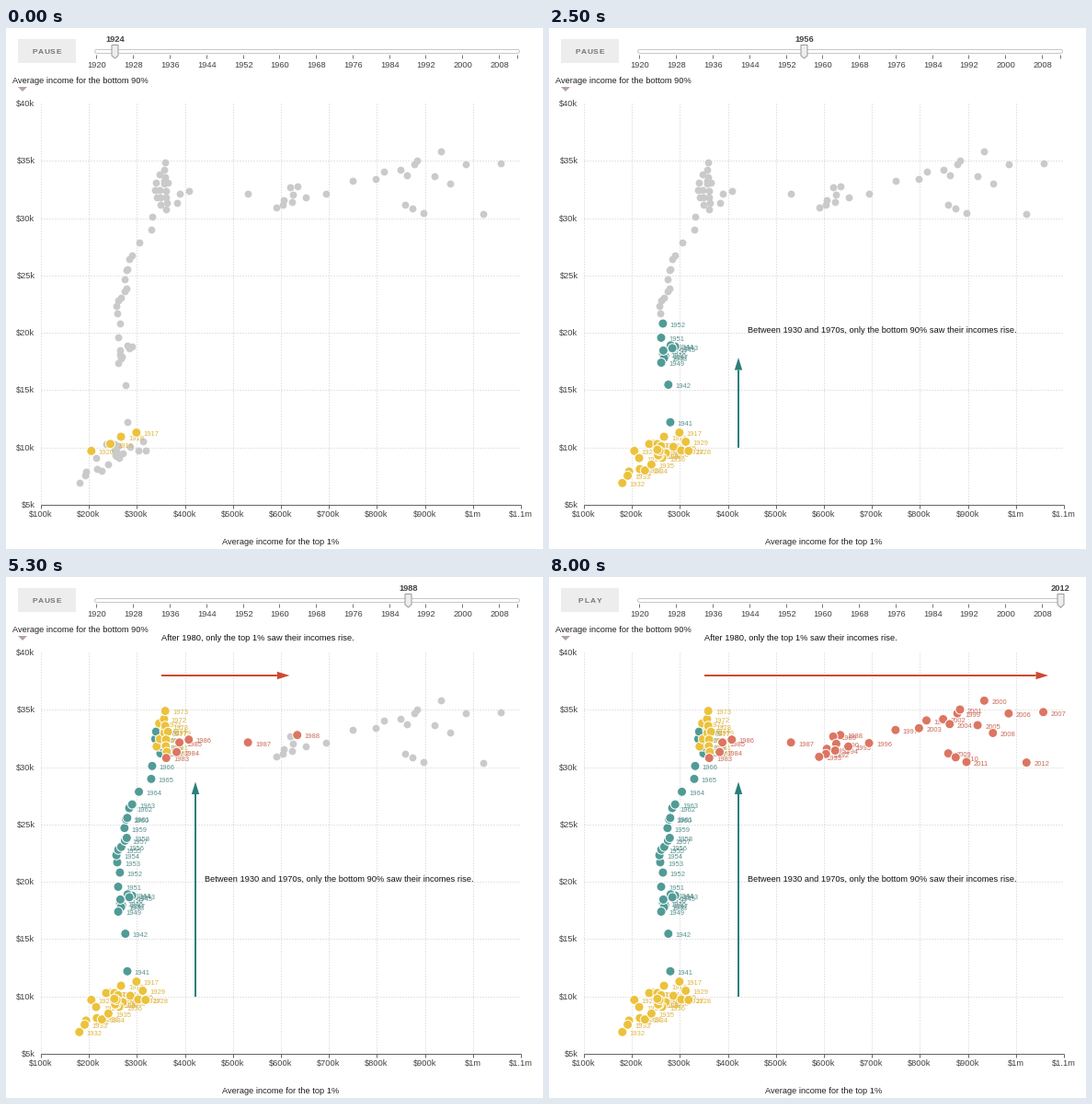
A matplotlib script for the animation above (8050 ms loop, 584 px wide and 566 px high).

```python
import math

import matplotlib.pyplot as plt
import numpy as np
from matplotlib.animation import FuncAnimation
from matplotlib.colors import to_rgba
from matplotlib.patches import FancyBboxPatch, Polygon, Rectangle

W, H, DPI = 584, 566, 128
PX = 72 / DPI                      # one pixel in points
INTERVAL, FRAMES = 50, 161
HOLD = 1.4                         # drawn pictures last 70 ms on a 50 ms clock
STEP = 4.5                         # pictures per four-year step
FADE = 4.2 / STEP

FIRST, LAST, START = 1917, 2012, 1924
PERIOD_ENDS = [1941, 1971, 1983]
FILLS = ["#ecc23c", "#519b96", "#dc7562"]
INKS = ["#dfb545", "#5a9390", "#cb6a5a"]

# Turning points: year, top 1% and bottom 90% income in $1000
TURNS = np.array([
    (1917, 299, 11.3), (1920, 205, 9.7), (1921, 194, 7.9), (1923, 236, 10.3),
    (1928, 318, 9.7), (1929, 312, 10.5), (1932, 180, 6.9), (1936, 263, 9.1),
    (1940, 253, 9.8), (1941, 280, 12.2), (1943, 290, 18.8), (1949, 261, 17.4),
    (1953, 259, 21.7), (1963, 290, 26.75), (1967, 349, 31.2), (1970, 340, 33.1),
    (1973, 359, 34.9), (1975, 341, 31.8), (1978, 359, 33.6), (1983, 361, 30.8),
    (1986, 408, 32.4), (1988, 634, 32.8), (1993, 590, 30.9), (1996, 694, 32.1),
    (2000, 934, 35.8), (2003, 798, 33.4), (2007, 1057, 34.8), (2009, 859, 31.2),
    (2011, 897, 30.45), (2012, 1022, 30.4)])


def income_x(top):
    return 38 + (top - 100) * 0.522


def income_y(bottom):
    return 82 + (40 - bottom) * 12.457


def year_x(year):
    return 98.5 + (year - 1920) * 4.972


def make_dots():
    """Follow the turning points, with a little scatter in between."""
    turn, top, bottom = TURNS.T
    scatter = np.random.default_rng(4).normal(0, 1, (2, len(years)))
    scatter *= ~np.isin(years, turn)
    return np.column_stack([income_x(np.interp(years, turn, top) + 5 * scatter[0]),
                            income_y(np.interp(years, turn, bottom) + 0.15 * scatter[1])])


years = np.arange(FIRST, LAST + 1)
dots = make_dots()
kinds = np.array([0, 1, 0, 2])[np.digitize(years, PERIOD_ENDS)]
fills = np.array([to_rgba(FILLS[k]) for k in kinds])
starts = np.ceil((years - START) / 4)

plt.rcParams["font.family"] = "Liberation Sans"
fig = plt.figure(figsize=(W / DPI, H / DPI), dpi=DPI, facecolor="white")
ax = fig.add_axes([0, 0, 1, 1])
ax.set_xlim(0, W)
ax.set_ylim(H, 0)
ax.axis("off")


def text(x, y, s, size=9.3, color="#222222", ha="left", **kw):
    return ax.text(x, y, s, fontsize=size * PX, color=color, ha=ha, va="baseline", **kw)


def rule(x0, y0, x1, y1, color="#666666", **kw):
    """One-pixel line through pixel centres."""
    ax.plot([x0 + 0.5, x1 + 0.5], [y0 + 0.5, y1 + 0.5], color=color, lw=PX,
            solid_capstyle="butt", snap=False, **kw)


def ease(t):
    t = min(max(t, 0), 1)
    return 4 * t ** 3 if t < 0.5 else 1 - 4 * (1 - t) ** 3


def money(k):
    return f"${k}k" if k < 1000 else f"${k / 1000:g}m"


def draw_axes():
    dotted = dict(color="#cccccc", dashes=(1, 2), dash_capstyle="butt", zorder=0)
    for k in range(5, 41, 5):
        y = round(income_y(k))
        text(31.5, y + 3.3, money(k), color="#444444", ha="right")
        if 5 < k < 40:
            rule(38, y, 560, y, **dotted)
    for k in range(100, 1101, 100):
        x = round(income_x(k))
        text(x, 531.3, money(k), color="#444444", ha="center")
        rule(x, 518, x, 522)
        if k < 1100:
            rule(x, 82, x, 518, **dotted)
    rule(38, 518, 560, 518)
    text(6.7, 60, "Average income for the bottom 90%")
    text(299, 561.2, "Average income for the top 1%", ha="center")
    ax.add_patch(Polygon([(13, 64), (23, 64), (18, 69)], fc="#b3a0a8", ec="none"))


def draw_slider():
    ax.add_patch(FancyBboxPatch((96.5, 23.5), 462, 4, fc="white", ec="#c8c8c8", lw=PX,
                                boxstyle="round,pad=0,rounding_size=2"))
    for year in [*range(1920, 2009, 8), LAST]:
        x = round(year_x(year))
        rule(x, 29, x, 33, "#777777")
        if year < LAST:
            text(x + 0.5, 43.3, str(year), color="#444444", ha="center")


def button_word(word):
    mid = (len(word) - 1) / 2
    return [text(44.5 + 6.5 * (i - mid), 28.2, c, 8.4, "#777777", "center", weight="bold")
            for i, c in enumerate(word)]


class Arrow:
    """Arrow with a caption; grows at an even speed from its tail."""

    def __init__(self, tail, way, reach, begin, steps, color, caption):
        self.tail, self.way = np.array(tail, float), np.array(way, float)
        self.side = self.way[::-1]
        self.reach, self.begin, self.steps = reach, begin, steps
        self.shaft, = ax.plot([], [], color=color, lw=2 * PX, snap=False,
                              solid_capstyle="butt", zorder=5)
        self.head = ax.add_patch(Polygon(np.zeros((3, 2)), fc=color, ec="none", zorder=5))
        self.caption = text(*caption, color="#111111", zorder=5)

    def update(self, step):
        t = step - self.begin
        for part in (self.shaft, self.head, self.caption):
            part.set_visible(t >= 0)
        if t < 0:
            return
        neck = self.tail + self.way * self.reach * min(t / self.steps, 1)
        self.shaft.set_data(*zip(self.tail, neck))
        self.head.set_xy([neck + 4.2 * self.side, neck + 13.5 * self.way,
                          neck - 4.2 * self.side])
        self.caption.set_alpha(ease(t / FADE))


draw_axes()
draw_slider()
ax.add_patch(Rectangle((13, 12), 63, 26, fc="#ededed", ec="none"))
words = {w: button_word(w) for w in ("PAUSE", "PLAY")}

knob_shape = np.array([(-3.5, 18.5), (3.5, 18.5), (3.5, 30), (0, 33), (-3.5, 30)])
knob = ax.add_patch(Polygon(knob_shape, fc="#eeeeee", ec="#999999", lw=PX, zorder=6))
knob_year = text(0, 15.3, "", color="#444444", ha="center", weight="bold")

ax.scatter(*dots.T, s=(7.8 * PX) ** 2, c="#cacaca", linewidths=0, zorder=2)
labels = [text(x + 8, y + 3.8, str(year), 7.6, INKS[k], zorder=3)
          for (x, y), year, k in zip(dots, years, kinds)]
marks = ax.scatter(*dots.T, s=(10 * PX) ** 2, c=fills, linewidths=PX, zorder=4)

arrows = [
    Arrow((206, 456), (0, -1), 220, 5, 8.05, "#2b7f79",
          (216, 331.2, "Between 1930 and 1970s, only the bottom 90% saw their incomes rise.")),
    Arrow((169, 107), (1, 0), 360.5, 14, 8.53, "#cd4a31",
          (169, 69.2, "After 1980, only the top 1% saw their incomes rise.")),
]


def update(frame):
    picture = int((frame + 0.5) / HOLD)
    step = (picture + 0.4) / STEP
    year = min(START + 4 * math.floor(step), LAST)

    x = round(year_x(year))
    knob.set_xy(knob_shape + (x + 0.5, 0))
    knob_year.set_x(x + 0.5)
    knob_year.set_text(str(year))

    shown = "PLAY" if step >= 23 else "PAUSE"
    for word, letters in words.items():
        for letter in letters:
            letter.set_visible(word == shown)

    alpha = np.array([ease((step - s) / FADE) for s in starts])
    face, edge = fills.copy(), np.ones_like(fills)
    face[:, 3] = edge[:, 3] = alpha
    marks.set_facecolor(face)
    marks.set_edgecolor(edge)
    for label, a in zip(labels, alpha):
        label.set_visible(a > 0.01)
        label.set_alpha(a)

    for arrow in arrows:
        arrow.update(step)
    return []


anim = FuncAnimation(fig, update, frames=FRAMES, interval=INTERVAL,
                     repeat=True, repeat_delay=0, blit=False)
plt.show()
```
